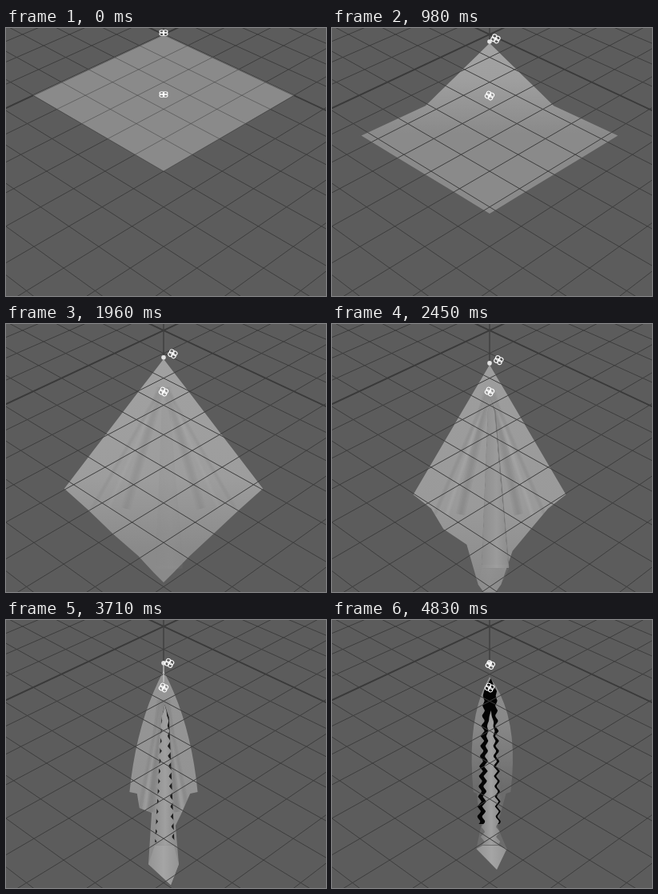
Recreate the animation shown at these times as an HTML page with a canvas. Size 400 px wide and 335 px high, loop 4900 ms.

```html
<!DOCTYPE html>
<html lang="en">
<head>
<meta charset="utf-8">
<title>Falling cloth</title>
<style>
html, body { margin: 0; width: 100%; height: 100%; overflow: hidden; background: #5c5c5c; }
canvas { display: block; width: 400px; height: 335px; }
</style>
</head>
<body>
<canvas id="stage" width="400" height="335"></canvas>
<script>
const ctx = document.getElementById('stage').getContext('2d');
const LOOP = 4900, HOLD = 420, STEP = 70, MID = 197;

const clamp = v => Math.min(1, Math.max(0, v));
const mix = (a, b, p) => a + (b - a) * p;
const ramp = (n, from, to) => clamp((n - from) / (to - from));
const smooth = p => p * p * (3 - 2 * p);
const drop = (n, scale, power) => 1 - Math.exp(-((n / scale) ** power));
const saw = v => Math.abs(v - 2 * Math.floor(v / 2) - 1) * 2 - 1;
const grey = (v, a = 1) => `rgba(${v | 0},${v | 0},${v | 0},${a})`;

function trace(points) {
  const path = new Path2D();
  points.forEach(([x, y]) => path.lineTo(x, y));
  return path;
}

function fill(points, style) {
  ctx.fillStyle = style;
  ctx.fill(trace(points));
}

function line(from, to, style, width) {
  ctx.strokeStyle = style;
  ctx.lineWidth = width;
  ctx.stroke(trace([from, to]));
}

function shade(x0, y0, x1, y1, ...stops) {
  const g = ctx.createLinearGradient(x0, y0, x1, y1);
  stops.forEach(([at, v]) => g.addColorStop(at, grey(v)));
  return g;
}

// Floor plane in perspective; five cells make one unit.
function floor(u, v) {
  const w = 1 - .098 * (u + v);
  return [MID + 147 * (u - v) / w, (8 + 67.96 * (u + v)) / w];
}

function grid(alpha) {
  for (let k = -14; k <= 20; k++) {
    const u = k / 5, style = grey(k ? 61 : 58, alpha), width = k ? 1 : 1.9;
    line(floor(u, -3), floor(u, 4), style, width);
    line(floor(-3, u), floor(4, u), style, width);
  }
}

// The main measures of the cloth after n steps of falling.
function measure(n) {
  const pin = 8 + 46 * drop(n, 19.9, 1.92);
  return {
    pin,
    apex: pin + 2 * ramp(n, 0, 9) + 15 * ramp(n, 30, 64),
    half: 6 + 157 / (1 + (n / 32.8) ** 3.13),
    cornerY: 84 + 131 * drop(n, 13.4, 1.8),
    tipX: MID + 9 * smooth(ramp(n, 30, 48)),
    tipY: 179 + 185 * drop(n, 17.8, 1.595) - 52 * ramp(n, 30, 64) ** .8,
    gather: smooth(ramp(n, 20, 40)),
    late: ramp(n, 48, 64)
  };
}

// One edge from apex to tail; side is -1 for left, 1 for right.
function edge(n, m, side) {
  const { half, cornerY, apex, tipY, gather, late } = m;
  const at = (x, y) => [MID + 3 * late * (x / half) + side * x, y];
  const k = clamp(n / 18);
  const kneeX = k * half, kneeY = cornerY - .466 * (1 - k) * half;
  const bulge = 22 * ramp(n, 32, 60);
  const points = [];
  for (let i = 0; i <= 10; i++) {
    const p = i / 10, out = 2 * p * (1 - p);
    points.push(at(kneeX * p + bulge * out, mix(apex, kneeY, p) - bulge * out));
  }
  const hem = (q, x, y) => at(mix(half * (1 - q), x, gather), mix(mix(cornerY, tipY, q), y, gather));
  points.push(
    at(half, cornerY),
    hem(.25, half * .78, cornerY + 2),
    hem(.5, half * (.61 - side * .1), cornerY + 24 + side * 4),
    hem(.75, half * .35, cornerY + 34 + side * 8),
    hem(.9, 19, tipY - 26)
  );
  return points;
}

// Zigzag band along the centre fold.
function band(b, topY, endY, left, right, amp) {
  const a = [], c = [];
  for (let y = topY; y <= endY; y += 2) {
    const p = clamp((y - b.top) / (b.end - b.top)), open = clamp((y - topY) / 16);
    const x = mix(198.5, b.endX, p), w = mix(3, b.half, p) * open;
    const z = amp * clamp((y - topY) / 60) * saw(y / 6.3);
    a.push([x - w - left * open + z, y]);
    c.unshift([x + w + right * open * (1 - .6 * p) + z, y]);
  }
  return a.concat(c);
}

function crease(from, to, width, style) {
  for (let i = 1; i <= 4; i++) line(from, to, style, width * i / 4);
}

function creases(n, m) {
  const force = ramp(n, 15, 32) * (1 - .7 * m.late);
  for (const side of [-1, 1]) {
    for (const [spread, width, tone, alpha] of [[.38, 12, 100, .09], [.56, 7, 185, .07], [.72, 6, 105, .05]]) {
      crease([MID + side * 3, m.apex + 36], [MID + side * m.half * spread, m.cornerY + 25],
        width, grey(tone, alpha * force));
    }
  }
}

function centreFold(n, m, left, right) {
  const black = ramp(n, 48, 62), amp = 2.6 * ramp(n, 26, 44);
  const settle = ramp(n, 30, 40);
  const b = {
    top: m.apex + 42,
    end: mix(306, 282, settle),
    endX: mix(204, 198, settle),
    half: mix(17, 12, settle) - 2 * black
  };
  ctx.globalAlpha = ramp(n, 22, 31);
  const darkTop = mix(b.top, m.apex + 2, black), darkEnd = mix(b.end - 4, 256, black);
  fill(band(b, darkTop, darkEnd, 6 * black, 1.6 + 2.4 * black, amp * black), grey(mix(125, 4, ramp(n, 28, 54))));
  const light = shade(b.endX - b.half, 0, b.endX + b.half, 0, [0, 143 - 8 * black], [.55, 160], [1, 142]);
  fill(band(b, b.top, b.end, 0, 0, amp), light);

  ctx.globalAlpha = ramp(n, 28, 40);
  fill([left, [m.tipX, m.tipY], right, [b.endX + b.half, b.end], [b.endX - b.half, b.end]],
    shade(left[0], 0, right[0], 0, [0, 148], [.5, 165], [1, 148]));
  ctx.globalAlpha = 1;
}

function cloth(n, m) {
  const left = edge(n, m, -1), right = edge(n, m, 1);
  const tail = [left, right].map(side => side[side.length - 1]);
  const high = 139 + 27 * drop(n, 6, 2) - .5 * Math.max(0, n - 14);
  const low = 138 - 30 * m.late;
  const bend = .6 * ramp(n, 0, 26) - .35 * m.late;
  const outline = [...left, [m.tipX, m.tipY], ...right.reverse()];
  fill(outline, shade(0, m.apex, 0, m.tipY, [0, high], [bend, mix(high, low, .15)], [bend + .32, low], [1, low]));
  ctx.save();
  ctx.clip(trace(outline));
  creases(n, m);
  ctx.restore();
  if (n > 22) centreFold(n, m, ...tail);
  ctx.save();
  ctx.clip(trace(outline));
  grid(n ? 1 : .5);
  ctx.restore();
}

// Small knot of four loops.
function handle(x, y, turn, flat) {
  ctx.save();
  ctx.translate(x, y);
  ctx.rotate(turn);
  ctx.scale(1, flat);
  ctx.strokeStyle = '#fff';
  ctx.lineWidth = 1.1;
  for (let i = 0; i < 4; i++) {
    ctx.beginPath();
    ctx.arc(i & 1 ? 2.2 : -2.2, i & 2 ? 2 : -2, 2.8, 0, 7);
    ctx.stroke();
  }
  ctx.restore();
}

function draw(n) {
  const m = measure(n);
  ctx.fillStyle = '#5c5c5c';
  ctx.fillRect(0, 0, 400, 335);
  grid(1);
  line([MID, 0], [MID, m.pin], grey(62), 1.4);
  cloth(n, m);
  if (n > 36) line([MID, m.pin], [MID, m.apex + 14], grey(205, 1 - ramp(n, 50, 60)), 1.2);
  if (n) {
    ctx.fillStyle = '#e2e2e2';
    ctx.beginPath();
    ctx.arc(MID, m.pin, 2.8, 0, 7);
    ctx.fill();
  }
  const turn = .5 * ramp(n, 0, 9), flat = n ? .95 : .72;
  const swing = 11.5 * Math.sin(Math.PI * (n / 66) ** .75);
  const lift = 2 + 2.5 * Math.sin(Math.PI * ramp(n, 0, 40)) - 4 * ramp(n, 32, 64);
  handle(MID, n ? 84.5 : 83, turn, flat);
  handle(MID + swing, m.pin - lift, turn, flat);
}

function tick() {
  const t = performance.now() % LOOP;
  draw(t < HOLD ? 0 : Math.floor((t - HOLD) / STEP) + 1);
  requestAnimationFrame(tick);
}
tick();
</script>
</body>
</html>
```
